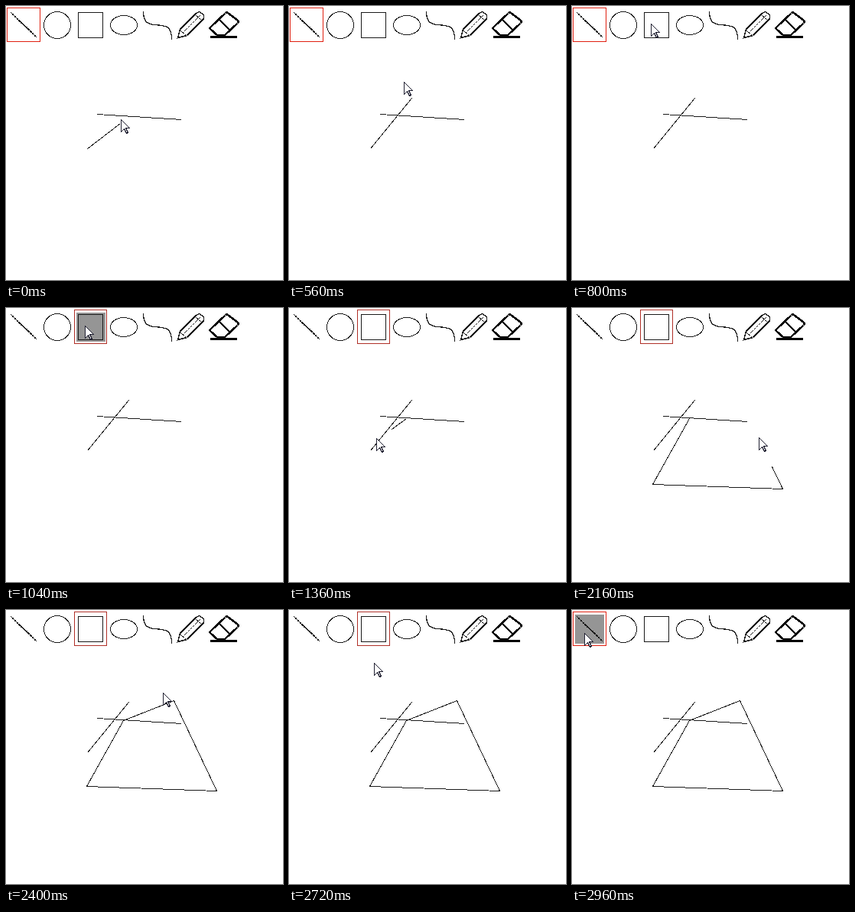
Animation of 362 by 358 pixels, one loop 3.04 s. Source, as an HTML page:

```html
<!DOCTYPE html>
<html lang="en">
<head>
<meta charset="utf-8">
<title>Drawing tools</title>
<style>
  html, body { margin: 0; width: 100%; height: 100%; overflow: hidden; background: #fff; }
  svg { display: block; shape-rendering: crispEdges; }
  .ink { fill: none; stroke: #1a1a1a; }
  .bold { stroke: #000; stroke-width: 2.5; }
</style>
</head>
<body>
<svg width="362" height="358" viewBox="0 0 362 358">
  <rect id="hover" width="38" height="38" y="6" fill="#959595"/>
  <rect id="frame" y="2.5" height="44" fill="none"/>

  <g class="ink" transform="translate(.5 .5)">
    <path d="M6 8L40 41"/>
    <path d="M8 10L38 39" stroke-width="2" stroke-dasharray="2 2"/>
    <circle cx="66.5" cy="24.5" r="17.5"/>
    <rect x="94" y="8" width="32" height="33"/>
    <ellipse cx="153.5" cy="24.5" rx="17.5" ry="12.5"/>
    <path d="M179 6C179 19 183 23 193 24C208 25 216 25 216 43" stroke-width="1.3"/>
    <path d="M224 41L227 30L248 9L252 7L258 11L258 16L236 38Z" stroke-width="1.5"/>
    <path d="M227 31L235 38M232 33L253 12M246 10L256 19" stroke-dasharray="3 1"/>
    <g class="bold">
      <path d="M267 27L286 9Q288 7 290 9L302 18Q304 20 302 22L285 38H276L267 30Q265 28 267 27ZM278 17L292 31"/>
      <path d="M266 40H301"/>
    </g>
  </g>

  <g class="ink" transform="translate(.5 1.5)">
    <path d="M119 140L229 147"/>
    <path id="line"/>
    <path id="shape"/>
  </g>
  <path id="cursor" d="M.5.5V16.5L4.5 12.5L7.5 18.5L9.5 17.5L6.5 11.5H11.5Z" fill="#fff" stroke="#223"/>
</svg>
<script>
const STEP = 80, STEPS = 38;
const $ = id => document.getElementById(id);

const tools = {
  line: { x: 1.5, width: 43, stroke: '#e02010' },
  square: { x: 89.5, width: 42, stroke: '#b03028' }
};

// The pointer rests between moves; ease is the power of the time curve.
const home = [149, 152];
const moves = [
  { from: -1, to: 0, end: [150, 148] },
  { from: 0, to: 3, end: [160, 119] },
  { from: 3, to: 5, end: [153, 104] },
  { from: 6, to: 10, end: [103, 23], ease: 2 },
  { from: 13, to: 15, end: [153, 143] },
  { from: 15, to: 17, end: [114, 170] },
  { from: 17, to: 19, end: [105, 229], ease: 2 },
  { from: 19, to: 21, end: [275, 235] },
  { from: 24, to: 28, end: [219, 117], ease: 2 },
  { from: 28, to: 30, end: [205, 108] },
  { from: 32, to: 36, end: [16, 30] }
];
const lineStart = [106, 185], lineDone = 3;
const clicks = [15, 19, 21, 28];
const shapeDone = clicks[clicks.length - 1];

function pointer(n) {
  let pos = home;
  for (const { from, to, end, ease = 1 } of moves) {
    if (n <= from) break;
    const t = Math.min(1, (n - from) / (to - from)) ** ease;
    pos = pos.map((v, i) => Math.round(v + (end[i] - v) * t));
  }
  return pos;
}

const path = points => 'M' + points.map(p => p.join(' ')).join('L');
const set = (id, attrs) => {
  for (const name in attrs) $(id).setAttribute(name, attrs[name]);
};

function shapePath(pen) {
  if (pen < clicks[0]) return '';
  const corners = clicks.filter(c => c <= pen).map(pointer);
  return pen < shapeDone ? path([...corners, pointer(pen)]) : path(corners) + 'Z';
}

function draw(n) {
  const tool = n >= 12 && n < 36 ? tools.square : tools.line;
  const hovered = n === 12 || n === 13 || n >= 36;
  set('frame', tool);
  set('hover', { x: tool.x + 2, visibility: hovered ? 'visible' : 'hidden' });

  const pen = n - 1; // ink trails the pointer by one step
  set('line', { d: path([lineStart, pointer(Math.min(pen, lineDone))]) });
  set('shape', { d: shapePath(pen) });
  set('cursor', { transform: `translate(${pointer(n)})` });
}

let last = -1;
function tick() {
  const n = Math.floor(performance.now() / STEP) % STEPS;
  if (n !== last) draw(last = n);
  requestAnimationFrame(tick);
}
tick();
</script>
</body>
</html>
```
